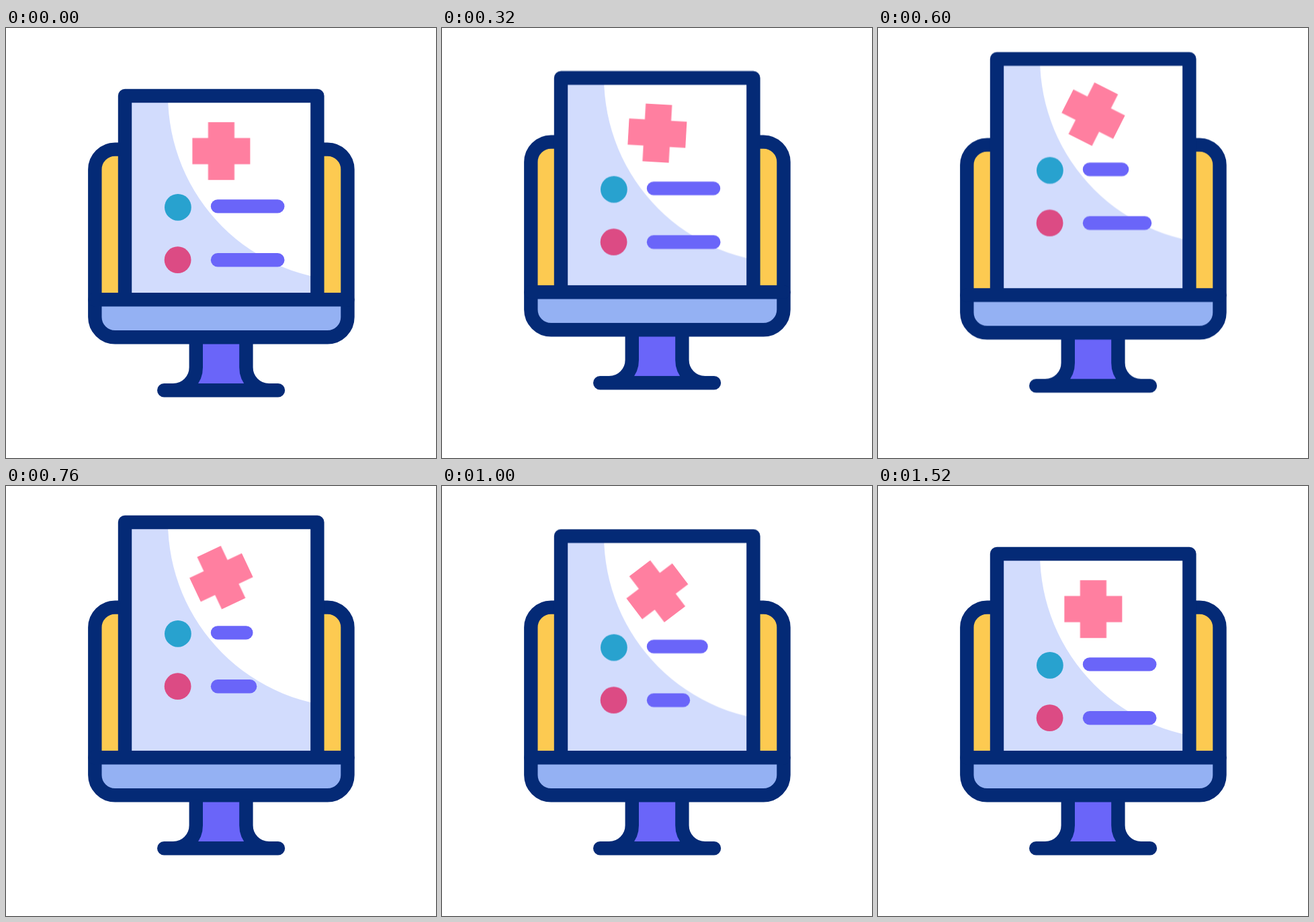
An HTML page that plays this animation: 640 px wide and 640 px high, repeating every 1680 ms.

```html
<!DOCTYPE html>
<html lang="en">
<head>
<meta charset="utf-8">
<title>Medical report on screen</title>
<style>
  html, body { margin: 0; width: 100%; height: 100%; overflow: hidden; background: #fff; }
  svg { display: block; width: 100vw; height: 100vh; }

  .ink { fill: none; stroke: #042a76; stroke-width: 20.4; stroke-linecap: round; stroke-linejoin: round; }
  .bar { stroke: #6a65f9; stroke-width: 20.4; stroke-linecap: round; stroke-dasharray: 89.3 300; }

  .monitor, .paper, .cross, .bar { animation: 1680ms cubic-bezier(.67, 0, .33, 1) infinite; }
  .monitor { animation-name: bob; }
  .paper { animation-name: slide; }
  .cross { animation-name: turn; }
  .bar { animation-name: trim; }
  .late { animation-delay: 160ms; }

  @keyframes bob {
    0%, 4.76%, 46.43%, 100% { transform: translateY(0); }
    25.6% { transform: translateY(-12.6px); }
  }
  @keyframes slide {
    0%, 85.71%, 100% { transform: translateY(0); }
    2.38% { transform: translateY(0); animation-timing-function: cubic-bezier(.7, 0, .4, 1); }
    38.1% { transform: translateY(-48.5px); animation-timing-function: cubic-bezier(.55, 0, .37, 1); }
  }
  @keyframes turn {
    0%, 7.14% { transform: rotate(0deg); }
    91.67%, 100% { transform: rotate(180deg); }
  }
  @keyframes trim {
    0%, 16.67%, 72.62%, 100% { stroke-dasharray: 89.3 300; }
    44.64% { stroke-dasharray: 42.3 300; }
  }
</style>
</head>
<body>
<svg viewBox="0 0 640 640">
  <defs>
    <clipPath id="slot"><rect y="-100" width="640" height="504"/></clipPath>
    <clipPath id="sheet"><rect x="177" y="101" width="286.5" height="400"/></clipPath>
    <clipPath id="screen"><rect x="132" y="180.5" width="376.6" height="280" rx="30"/></clipPath>
  </defs>

  <g class="monitor">
    <!-- stand -->
    <path fill="#6a65f9" d="M283 460V505Q283 525 275 535H365Q357 525 357 505V460Z"/>
    <path class="ink" d="M282.8 465V505a34 34 0 0 1-34 34.2M357.4 465V505a34 34 0 0 0 34 34.2M235.2 539.2H405"/>

    <!-- screen -->
    <g clip-path="url(#screen)">
      <rect x="132" y="180" width="377" height="224" fill="#fdca51"/>
      <rect x="132" y="404" width="377" height="57" fill="#94b1f3"/>
    </g>
    <rect class="ink" x="132.3" y="180.6" width="376.2" height="279.6" rx="30"/>

    <!-- report -->
    <g clip-path="url(#slot)">
      <g class="paper">
        <g clip-path="url(#sheet)">
          <rect x="177" y="101" width="287" height="400" fill="#d2dcfd"/>
          <circle cx="517.7" cy="100" r="276.7" fill="#fff"/>
        </g>
        <path class="ink" d="M177 520V101H463.4V520"/>
        <g transform="translate(320.4 183.2)">
          <path class="cross" fill="#ff7fa0" d="M-19.6-43H19.6V-19.6H43V19.6H19.6V43H-19.6V19.6H-43V-19.6H-19.6Z"/>
        </g>
        <circle cx="255.9" cy="266.8" r="19.9" fill="#28a2cf"/>
        <circle cx="255.6" cy="345.2" r="19.9" fill="#dc4b84"/>
        <path class="bar" d="M315 265.4h89.3"/>
        <path class="bar late" d="M315 345.2h89.3"/>
      </g>
    </g>
    <path class="ink" d="M132.3 404.2H508.5"/>
  </g>
</svg>
</body>
</html>
```
